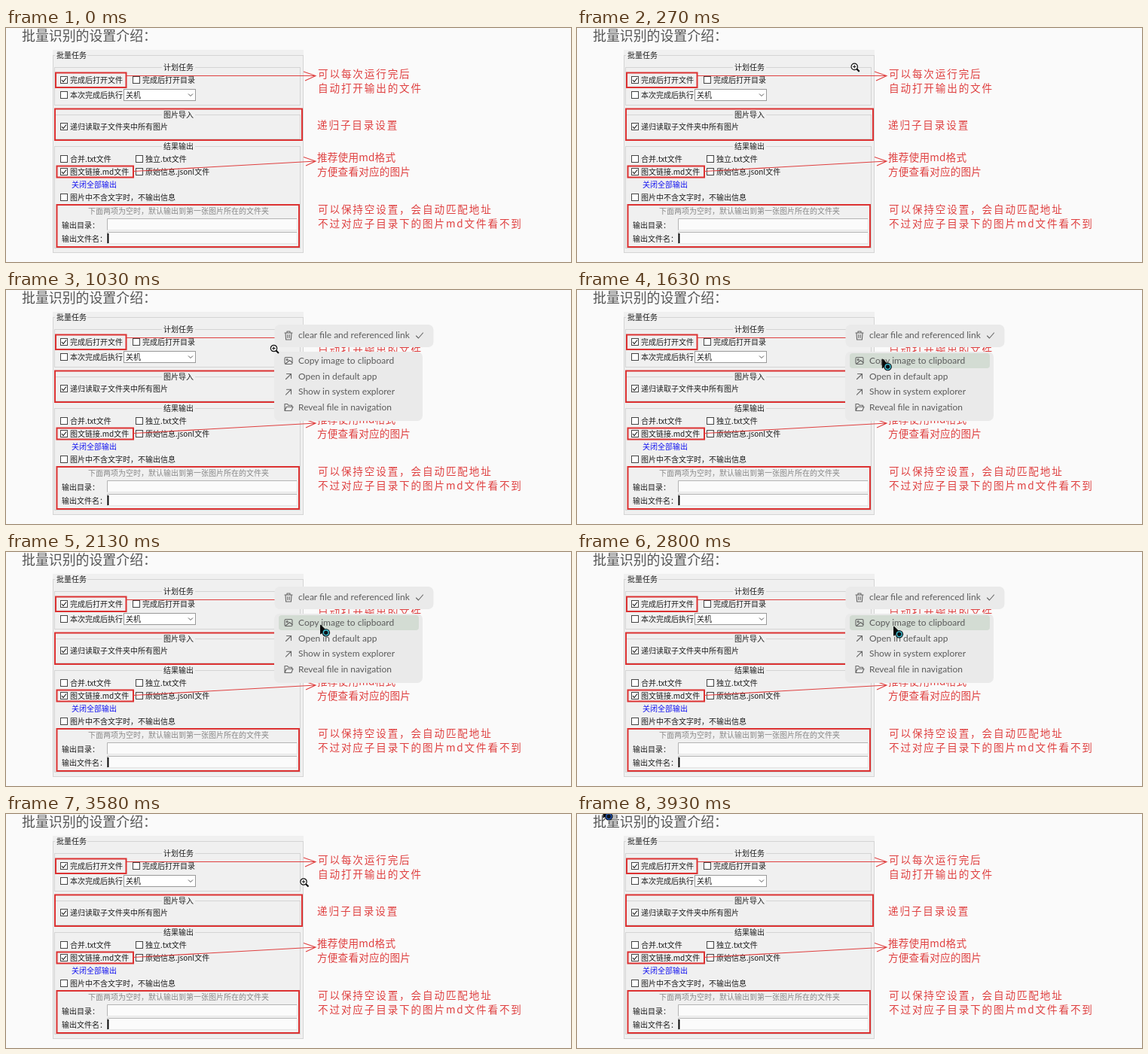
An HTML page for the animation above (4.14 s loop, 750x311 px).

```html
<!DOCTYPE html>
<html lang="zh-CN">
<head>
<meta charset="utf-8">
<title>批量识别</title>
<style>
  html, body { margin: 0; width: 100%; height: 100%; overflow: hidden; background: #fafafa; }
  svg { display: block; width: 750px; height: 311px; }
  text { font-family: "Noto Sans CJK SC", "Noto Sans CJK", sans-serif; white-space: pre; }
  .title { font-size: 17.9px; font-weight: 300; fill: #555; }
  .label { font-size: 10px; fill: #1c1c1c; }
  .mid { text-anchor: middle; }
  .note { font-size: 13.6px; font-weight: 300; fill: #df4040; letter-spacing: 1.85px; }
  .tight { letter-spacing: .2px; }
  .item { font-family: Lato, sans-serif; font-size: 12px; fill: #5c5c5c; }
  .line { fill: none; stroke: #d4d4d4; }
  .red { fill: none; stroke: #dc3232; stroke-width: 2; }
  .pointer { fill: none; stroke: #df4040; stroke-width: 1.1; }
  .icon { fill: none; stroke: #666; stroke-width: 1.1; stroke-linecap: round; stroke-linejoin: round; }
</style>
</head>
<body>
<svg viewBox="0 0 750 311">
  <rect width="750" height="311" fill="#fafafa"/>
  <text class="title" x="21" y="17.3">批量识别的设置介绍：</text>
  <g id="panel"></g>
  <g id="marks"></g>
  <g id="menu">
    <rect x="356.5" y="46" width="211" height="30" rx="7" fill="#eaeaea"/>
    <rect x="356" y="82" width="197" height="92" rx="7" fill="#eaeaea"/>
    <rect id="hover" x="362" y="84" width="186" height="20" rx="4" fill="#d3dcd3"/>
    <g class="icon">
      <path d="M370 57h10M373 57v-2h4v2M371 57l.6 9h6.8l.6-9M373.8 59.5v4M376.2 59.5v4"/>
      <path d="M544.5 61l3 3 6-7"/>
      <rect x="370" y="89.5" width="10" height="9" rx="1.5"/>
      <circle cx="373.2" cy="92.5" r="1"/>
      <path d="M371 98l5.5-4.5 3.5 3"/>
      <path id="open" d="M371.5 118.5l7-7M372.5 111.5h6v6"/>
      <use href="#open" y="20.7"/>
      <path d="M370 160.5v-9h3.5l1.5 1.8h4.5v2M370 160.5l2.3-5.2h8.7l-2.2 5.2z"/>
    </g>
    <g id="items"></g>
  </g>
  <g id="zoom">
    <path d="M3 3L6.5 6.5" stroke="#fff" stroke-width="3.8"/>
    <path d="M3 3L6.5 6.5" stroke="#111" stroke-width="2.2"/>
    <circle r="4.2" fill="#fff" stroke="#111" stroke-width="1.2"/>
    <path d="M-2.2 0h4.4M0-2.2v4.4" stroke="#111"/>
  </g>
  <g id="arrow">
    <path d="M0 0V12L3 9.5 8.5 8.5Z" fill="#0a0a0a" stroke="#0a0a0a"/>
    <circle cx="7.2" cy="10.3" r="5.3" fill="#0b1218"/>
    <circle id="ring" cx="7.2" cy="10.3" r="3.4" fill="none" stroke-width="1.4"/>
  </g>
</svg>
<script>
const $ = id => document.getElementById(id);
const text = (cls, x, y, s) => `<text class="${cls}" x="${x}" y="${y}">${s}</text>`;
const rect = (cls, x, y, w, h) => `<rect class="${cls}" x="${x}" y="${y}" width="${w}" height="${h}"/>`;
const label = (x, cy, s) => text('label', x, cy + 3.7, s);

function group(y, h, title) {
  return rect('line', 64.5, y + .5, 326, h) +
    `<rect x="207" y="${y - 4}" width="44" height="9" fill="#f0f0f0"/>` +
    text('label mid', 229, y + 4, title);
}

function check(x, cy, s, on) {
  const tick = on ? `<path d="M${x + 2} ${cy}l2 2.5 4-5" fill="none" stroke="#222" stroke-width="1.2"/>` : '';
  return `<rect x="${x + .5}" y="${cy - 4.5}" width="9" height="9" fill="#fff" stroke="#444"/>` +
    tick + label(x + 13, cy, s);
}

const field = (y, h) =>
  `<rect x="134.5" y="${y}" width="252" height="${h}" fill="#fbfbfb" stroke="#e6e6e6"/>` +
  `<path d="M134.5 ${y + h}V${y}H386" fill="none" stroke="#b4b4b4"/>`;

$('panel').innerHTML =
  '<rect x="62" y="29" width="333" height="270" fill="#f0f0f0"/>' +
  rect('line', 62.5, 36.5, 332, 262) +
  '<rect x="65" y="31" width="43" height="11" fill="#f0f0f0"/>' +
  label(67, 36.5, '批量任务') +
  group(52, 50, '计划任务') +
  check(72, 69, '完成后打开文件', true) +
  check(168, 69, '完成后打开目录') +
  check(72, 89, '本次完成后执行') +
  '<rect x="156.5" y="81.5" width="95" height="15" fill="#fff" stroke="#999"/>' +
  label(159, 89, '关机') +
  '<path d="M242 87.5l3 3 3-3" fill="none" stroke="#555"/>' +
  group(115, 32, '图片导入') +
  check(72, 131, '递归读取子文件夹中所有图片', true) +
  group(157, 135, '结果输出') +
  check(72, 174, '合并.txt文件') +
  check(172, 174, '独立.txt文件') +
  check(72, 191, '图文链接.md文件', true) +
  check(172, 191, '原始信息.jsonl文件') +
  '<text class="label" x="87" y="211.7" style="fill:#1414f0">关闭全部输出</text>' +
  check(72, 225, '图片中不含文字时，不输出信息') +
  '<text class="label mid" x="229" y="247.2" style="fill:#888">下面两项为空时，默认输出到第一张图片所在的文件夹</text>' +
  label(74, 262, '输出目录：') + field(253.5, 15) +
  label(74, 280, '输出文件名：') + field(271.5, 15) +
  '<path d="M135.5 273v13" stroke="#000" stroke-width="1.8"/>';

const notes = [
  ['note', 414, 61, '可以每次运行完后'],
  ['note', 414, 80, '自动打开输出的文件'],
  ['note', 413, 128.5, '递归子目录设置'],
  ['note tight', 413, 172, '推荐使用md格式'],
  ['note tight', 413, 191, '方便查看对应的图片'],
  ['note', 414, 241, '可以保持空设置，会自动匹配地址'],
  ['note', 414, 260, '不过对应子目录下的图片md文件看不到']
];

$('marks').innerHTML =
  rect('red', 66, 59.5, 93.5, 19.5) + rect('red', 65, 107.5, 328, 41.5) +
  rect('red', 67.5, 183.5, 101.5, 15) + rect('red', 67.5, 235, 321.5, 56) +
  '<path class="pointer" d="M160 63.5H411M395 58l16 5.5-14 6.5"/>' +
  '<path class="pointer" d="M169 190.5L411 177M395 171.5l16 5.5-13 6"/>' +
  notes.map(([cls, x, cy, s]) => text(cls, x, cy + 5, s)).join('');

$('items').innerHTML = [
  [64, 'clear file and referenced link'],
  [98, 'Copy image to clipboard'],
  [118.5, 'Open in default app'],
  [139.3, 'Show in system explorer'],
  [160, 'Reveal file in navigation']
].map(([y, s]) => text('item', 388, y, s)).join('');

// start, end, steps, from x, y, to x, y
const moves = [
  [50, 560, 6, 391, 5, 355.5, 77.5],
  [1320, 1810, 6, 360, 80, 414, 94],
  [1930, 2420, 6, 415, 95, 419, 98],
  [2510, 3010, 6, 419, 98, 421.5, 99.5],
  [3490, 3930, 5, 395, 90, 35, -7]
];
const LOOP = 4140;

function pointer(t) {
  const m = moves.filter(v => t >= v[0]).pop();
  if (!m) return null;
  const [a, b, n, x0, y0, x1, y1] = m;
  const step = Math.floor(Math.min(1, (t - a) / (b - a)) * (n - 1) + .02);
  const u = 1 - (1 - step / (n - 1)) ** 2;
  return [x0 + (x1 - x0) * u, y0 + (y1 - y0) * u];
}

const show = (id, on) => $(id).setAttribute('visibility', on ? 'inherit' : 'hidden');

function draw(t) {
  const p = pointer(t);
  const menu = t >= 1030 && t < 3010;
  const hover = menu && t >= 1420;
  const outside = p && p[1] < 28;
  const arrow = hover || outside;
  show('menu', menu);
  show('hover', hover);
  show('arrow', p && arrow);
  show('zoom', p && !arrow);
  if (p) $(arrow ? 'arrow' : 'zoom').setAttribute('transform', `translate(${p})`);
  $('ring').setAttribute('stroke', outside ? '#2456b8' : '#43c4d6');
}

const begin = performance.now();
function tick() {
  draw((performance.now() - begin) % LOOP);
  requestAnimationFrame(tick);
}
tick();
</script>
</body>
</html>
```
